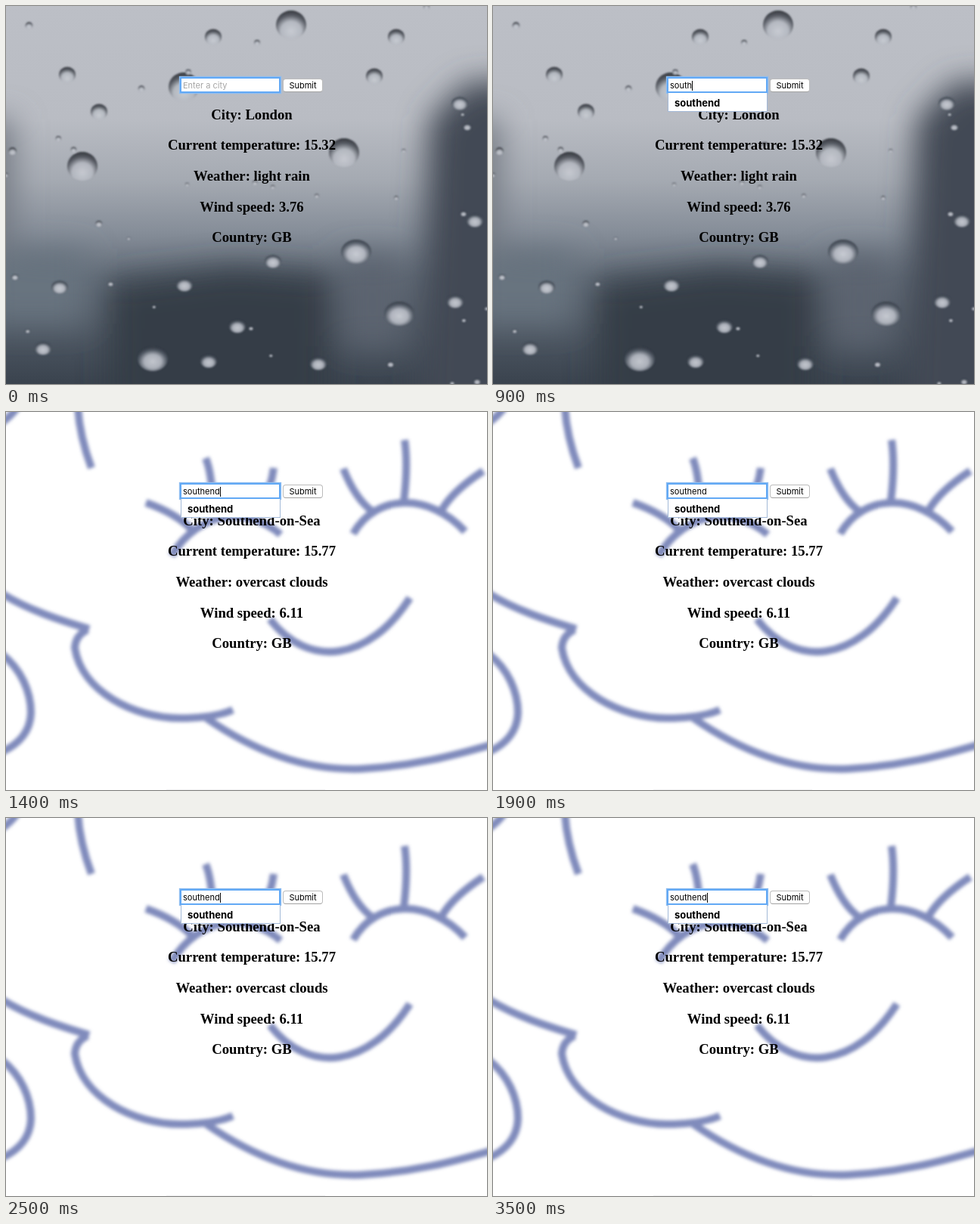
Recreate the animation shown at these times as an HTML page. Size 636 by 500 pixels, loop 3.6 s.

```html
<!DOCTYPE html>
<html lang="en">
<head>
<meta charset="utf-8">
<title>City weather</title>
<style>
  html, body { margin: 0; width: 100%; height: 100%; overflow: hidden; background: #fff; }
  #stage { position: relative; width: 636px; height: 500px; overflow: hidden; }
  #stage > * { position: absolute; box-sizing: border-box; }
  svg { left: 0; top: 0; width: 636px; height: 500px; }
  .line { left: 7px; width: 636px; text-align: center; color: #000; white-space: pre;
    font: bold 18.72px/20px "Liberation Serif", Times, serif; }
  #field, #send { font: 11px/17px Inter, Arial, sans-serif; color: #000; white-space: pre; background: #fff; }
  #field { left: 231px; top: 95px; width: 131px; height: 19px; padding: 2px 0 0 3px;
    box-shadow: inset 0 0 0 1px #62a9f5, 0 0 0 1px #62a9f5, 0 0 1px 2px #8fbdf0; }
  #hint { color: #a5a5a5; }
  #caret { display: inline-block; width: 1px; height: 13px; background: #000; vertical-align: -3px; }
  #send { left: 366px; top: 96px; width: 53px; height: 18px; border: 1px solid #bcbcbc;
    border-bottom-color: #a2a2a2; border-radius: 4px; text-align: center; }
  #list { left: 231px; top: 115px; width: 132px; height: 25px; padding-left: 8px; background: #fff;
    border: 1px solid #a3b9d8; border-top: 0; color: #000;
    font: 700 13px/27px Inter, Arial, sans-serif; }
</style>
</head>
<body>
<div id="stage">
  <svg id="rain" viewBox="0 0 636 500">
    <defs>
      <linearGradient id="sky" x2="0" y2="1">
        <stop offset="0" stop-color="#bcbfc6"/>
        <stop offset=".3" stop-color="#b9bcc3"/>
        <stop offset=".46" stop-color="#a5aab2"/>
        <stop offset=".6" stop-color="#858d98"/>
        <stop offset=".72" stop-color="#626c78"/>
        <stop offset="1" stop-color="#3a434e"/>
      </linearGradient>
      <radialGradient id="high" cy=".72" r=".75">
        <stop offset="0" stop-color="#c9ccd3"/>
        <stop offset=".45" stop-color="#b4b8c0"/>
        <stop offset=".72" stop-color="#50545c"/>
        <stop offset="1" stop-color="#1c1f25"/>
      </radialGradient>
      <radialGradient id="low" cy=".6" r=".62">
        <stop offset="0" stop-color="#d2d5dc"/>
        <stop offset=".45" stop-color="#b9bdc6"/>
        <stop offset=".75" stop-color="#545c67"/>
        <stop offset="1" stop-color="#2d343e"/>
      </radialGradient>
      <filter id="haze" x="-50%" y="-50%" width="200%" height="200%"><feGaussianBlur stdDeviation="20"/></filter>
      <filter id="soft"><feGaussianBlur stdDeviation="1.2"/></filter>
    </defs>
    <rect width="636" height="500" fill="url(#sky)"/>
    <g filter="url(#haze)">
      <path d="M-40 150H10V330H-40Z" fill="#757a84"/>
      <path d="M135 365L300 345L430 355V540H135Z" fill="#343c47"/>
      <path d="M560 150L610 100H690V540H545Z" fill="#424a55"/>
      <path d="M445 330H525V450H445Z" fill="#5b646f"/>
      <path d="M-30 325H105V420H-30Z" fill="#68737f"/>
    </g>
    <g id="drops" filter="url(#soft)"></g>
  </svg>
  <svg id="cloud" viewBox="0 0 636 500">
    <defs><filter id="blur" filterUnits="userSpaceOnUse" x="-20" y="-20" width="676" height="540"><feGaussianBlur stdDeviation="2.3"/></filter></defs>
    <rect width="636" height="500" fill="#fff"/>
    <path d="M212 499.5H422" stroke="#f3f3f5"/>
    <g fill="none" stroke="#808bbc" stroke-width="10" filter="url(#blur)">
      <path d="M-6 14Q5 7 15 -6M95 -6C97 25 104 50 113 74"/>
      <path d="M219 190C255 130 320 125 363 162M185 120Q225 134 246 156M264 61Q272 80 274 125M354 74Q351 100 335 130"/>
      <path d="M459 161C490 107 560 107 607 158M446 75Q462 115 484 131M527 37Q532 70 526 118M631 78Q590 105 576 130"/>
      <path d="M349 274C400 340 480 330 534 246"/>
      <path d="M-6 240C30 262 70 275 110 287M108 288Q92 295 91 312C100 370 170 405 230 405Q275 405 300 394"/>
      <path d="M265 405C330 450 400 475 470 472C540 468 590 455 642 440"/>
      <path d="M-6 320C20 340 33 370 33 398C32 425 15 440 -6 450"/>
    </g>
  </svg>
  <div id="field"><span id="hint">Enter a city</span><span id="typed"></span><span id="caret"></span></div>
  <div id="send">Submit</div>
  <div id="list">southend</div>
</div>
<script>
const LOOP = 3600, WORD = "southend";
const FIRST_KEY = 400, KEY_GAP = 115, SWITCH = 1400, BLINK = 500;
const $ = id => document.getElementById(id);

let seed = 11;
const random = () => (seed = seed * 16807 % 2147483647) / 2147483647;

function addDrop(x, y, r) {
  const low = y > 300 || x > 560;
  const drop = document.createElementNS("http://www.w3.org/2000/svg", "ellipse");
  const attrs = { cx: x, cy: y, rx: r, ry: r * (low ? .8 : .95), fill: `url(#${low ? "low" : "high"})`, opacity: .9 };
  for (const k in attrs) drop.setAttribute(k, attrs[k]);
  $("drops").append(drop);
}

// The prominent drops have set places; the fine ones are scattered.
const large = [[377, 25], [235, 107], [101, 212], [447, 194], [463, 325], [520, 407], [194, 467]];
const medium = [
  [274, 41], [516, 41], [81, 91], [487, 93], [123, 140], [600, 129], [620, 284],
  [353, 338], [236, 369], [71, 372], [594, 391], [306, 424], [49, 453], [268, 470], [413, 473]
];
for (const [x, y] of large) addDrop(x, y, 20);
for (const [x, y] of medium) addDrop(x, y, 11);
for (let i = 0; i < 32; i++) addDrop(random() * 636, random() * 500, 2.5 + 3.5 * random() ** 2);

const labels = ["City", "Current temperature", "Weather", "Wind speed", "Country"];
const reports = [
  ["London", "15.32", "light rain", "3.76", "GB"],
  ["Southend-on-Sea", "15.77", "overcast clouds", "6.11", "GB"]
];
const lines = labels.map((_, i) => {
  const line = document.createElement("div");
  line.className = "line";
  line.style.top = Math.round(133.8 + 40.6 * i) + "px";
  $("stage").insertBefore(line, $("field"));
  return line;
});

const show = (el, on) => el.style.visibility = on ? "visible" : "hidden";

function draw(t) {
  const typed = WORD.slice(0, Math.max(0, Math.floor((t - FIRST_KEY) / KEY_GAP) + 1));
  const found = t >= SWITCH;
  const caretOn = !found || (t - SWITCH) % (2 * BLINK) < BLINK;
  $("typed").textContent = typed;
  $("hint").style.display = typed ? "none" : "";
  show($("caret"), typed && caretOn);
  show($("list"), typed);
  show($("rain"), !found);
  show($("cloud"), found);
  lines.forEach((line, i) => line.textContent = `${labels[i]}: ${reports[+found][i]}`);
}

const start = performance.now();
function tick() {
  draw((performance.now() - start) % LOOP);
  requestAnimationFrame(tick);
}
draw(0);
requestAnimationFrame(tick);
</script>
</body>
</html>
```
